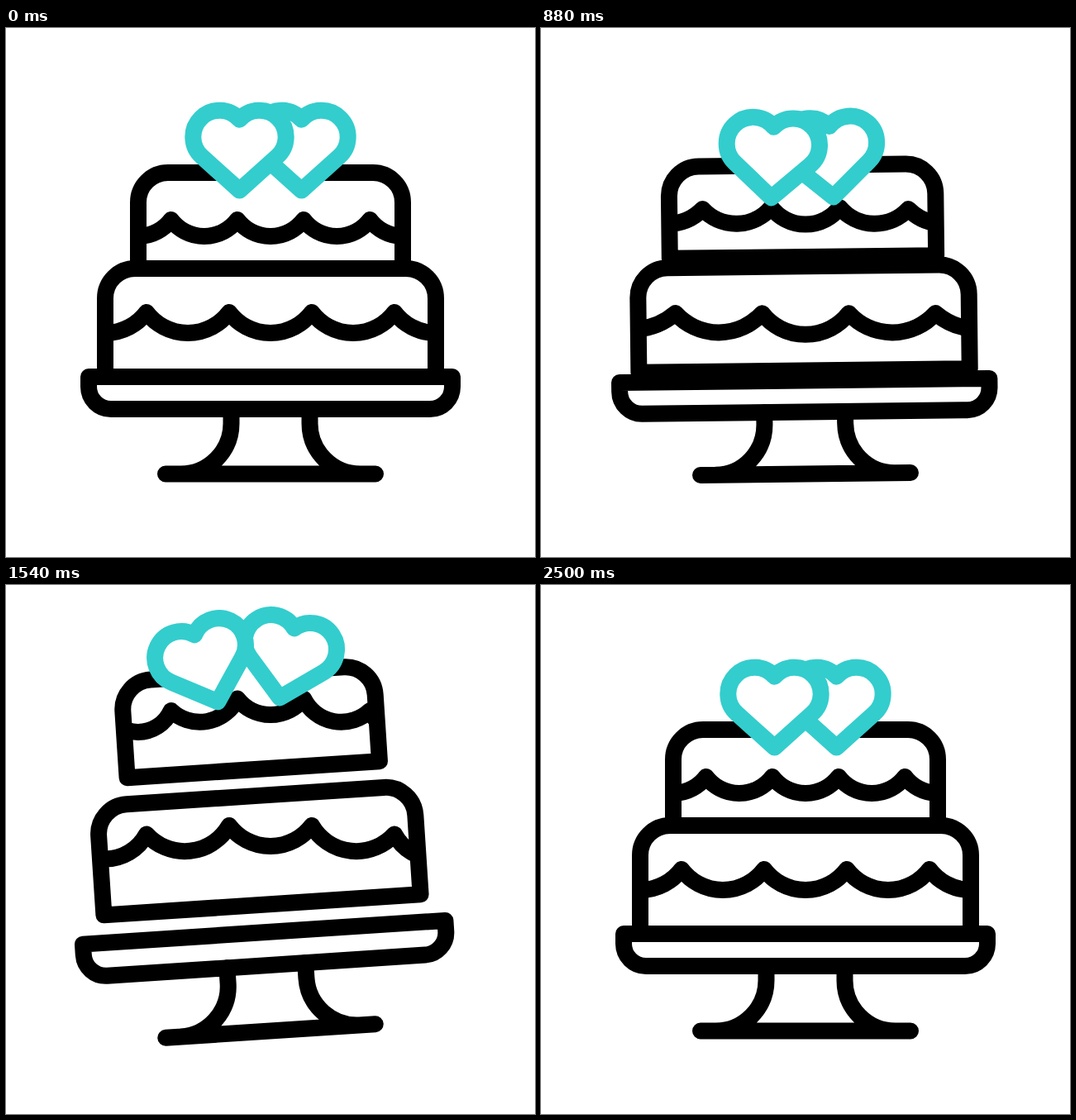
Recreate the animation shown at these times as an HTML page. Size 640 by 640 pixels, loop 3 s.

```html
<!DOCTYPE html>
<html lang="en">
<head>
<meta charset="utf-8">
<title>Jumping cake</title>
<style>
  html, body { margin: 0; width: 100%; height: 100%; overflow: hidden; background: #fff; }
  svg { display: block; width: 100vw; height: 100vh; }
  path { fill: none; stroke: #000; stroke-width: 20; stroke-linejoin: round; }
  .round { stroke-linecap: round; }
  .teal { stroke: #33cdcd; }
  .heart { fill: #fff; }
</style>
</head>
<body>
<!-- The origin is the middle of the foot of the stand. -->
<svg viewBox="-320 -539.5 640 640">
  <defs>
    <clipPath id="lowClip"><path id="lowShape"/></clipPath>
    <clipPath id="topClip"><path id="topShape"/></clipPath>
  </defs>
  <g clip-path="url(#lowClip)"><path id="lowIcing"/></g>
  <g clip-path="url(#topClip)"><path id="topIcing"/></g>
  <g id="cake">
    <path id="stand" class="round"/>
    <path id="plate"/>
    <path id="low"/>
    <path id="top"/>
    <path id="right" class="teal heart"/>
    <path id="left" class="teal heart"/>
    <path id="sparks" class="teal round"/>
  </g>
</svg>
<script>
const LOOP = 3000;
const el = {};
document.querySelectorAll('[id]').forEach(n => el[n.id] = n);

// Half widths and icing steps (across), and heights (down), of the key poses.
const REST = {
  across: { plate: 220, leg: 47.5, low: 200, top: 160, lowStep: 100, topStep: 80.2 },
  down: {
    plateTop: -117.5, plateBottom: -78.5,
    lowTop: -248.5, lowBottom: -117.5, topTop: -364.5, topBottom: -248.5,
    lowIn: -195.5, lowOut: -195.5, lowMid: -170.5, lowSide: -170.5, lowEnd: -170.5,
    topIn: -307.5, topOut: -307.5, topMid: -287.5, topSide: -287.5, topEnd: -287.5
  }
};
const SQUASH = {
  across: { plate: 227, leg: 50, low: 207, top: 168, lowStep: 109, topStep: 85.3 },
  down: {
    plateTop: -109.5, plateBottom: -72.5,
    lowTop: -232.5, lowBottom: -109.5, topTop: -340.5, topBottom: -232.5,
    lowIn: -164.5, lowOut: -170.5, lowMid: -138.5, lowSide: -145.5, lowEnd: -157,
    topIn: -278.5, topOut: -283.5, topMid: -257.5, topSide: -263.5, topEnd: -270.5
  }
};
const AIR = {
  across: { plate: 219.7, leg: 47.5, low: 192, top: 153, lowStep: 100, topStep: 80.2 },
  down: {
    plateTop: -119.5, plateBottom: -79.5,
    lowTop: -285, lowBottom: -153, topTop: -433.5, topBottom: -317,
    lowIn: -248.5, lowOut: -238, lowMid: -223.5, lowSide: -217.5, lowEnd: -208,
    topIn: -402, topOut: -387.5, topMid: -382.5, topSide: -374, topEnd: -361.5
  }
};

const lerp = (a, b, x) => a + (b - a) * x;
const easeOut = power => x => 1 - (1 - x) ** power;
const mix = (a, b, x) =>
  Object.fromEntries(Object.keys(a).map(k => [k, lerp(a[k], b[k], x)]));

// Each key is [time, value, easing towards it].
const track = (...keys) => t => {
  if (t <= keys[0][0]) return keys[0][1];
  for (let i = 1; i < keys.length; i++) {
    const [t0, v0] = keys[i - 1], [t1, v1, ease] = keys[i];
    if (t < t1) {
      const x = (t - t0) / (t1 - t0);
      return lerp(v0, v1, ease ? ease(x) : x);
    }
  }
  return keys[keys.length - 1][1];
};

const squash = (power, fall) => track(
  [205, 0], [560, 1, x => Math.sin(x * Math.PI / 2)], [740, 1],
  [1280, 0, easeOut(power)], [fall, 0], [2160, 1], [2500, 0]);
const spread = squash(2, 1580);
const sink = squash(1.45, 1700);
const tilt = track([740, 0], [1820, -5.05], [2320, 0]);
const heartTilt = track([205, 0], [740, 9], [1280, -15.5], [1680, -15.5], [2160, 9], [2500, 0]);
const heartDrop = track([205, 21.5], [560, 19], [740, 20], [880, 39], [1280, 33], [1800, 31], [2160, 21.5]);
const sparkHead = track([1190, 62], [1400, 106]);
const sparkTail = track([1280, 62], [1480, 106]);

function poseAt(t) {
  const base = t > 740 && t < 2160 ? AIR : REST;
  return {
    ...mix(base.across, SQUASH.across, spread(t)),
    ...mix(base.down, SQUASH.down, sink(t))
  };
}

// The outline starts and ends at a gap in the top edge.
const tier = (w, top, bottom, gap) =>
  `M${gap} ${top}H${w - 36}a36 36 0 0 1 36 36V${bottom}H${-w}V${top + 36}` +
  `a36 36 0 0 1 36 -36H${-gap}`;

function radius(ax, ay, bx, by, cx, cy) {
  const area = Math.abs((bx - ax) * (cy - ay) - (cx - ax) * (by - ay)) / 2;
  return Math.hypot(bx - ax, by - ay) * Math.hypot(cx - bx, cy - by) *
    Math.hypot(cx - ax, cy - ay) / (4 * area);
}

function icing(p, name) {
  const step = p[name + 'Step'];
  const peaks = ['Out', 'Out', 'In', 'In', 'Out', 'Out'].map(k => p[name + k]);
  const dips = ['End', 'Side', 'Mid', 'Side', 'End'].map(k => p[name + k]);
  let x = -2.5 * step, d = `M${x} ${peaks[0]}`;
  dips.forEach((dip, i) => {
    const r = radius(x, peaks[i], x + step / 2, dip, x + step, peaks[i + 1]);
    x += step;
    d += `A${r} ${r} 0 0 0 ${x} ${peaks[i + 1]}`;
  });
  return d;
}

function plate(w, top, bottom) {
  const r = 27;
  return `M${-w} ${top}H${w}V${bottom - r}a${r} ${r} 0 0 1 ${-r} ${r}` +
    `H${r - w}a${r} ${r} 0 0 1 ${-r} ${-r}Z`;
}

function stand(x, top) {
  const leg = s => `M${s * x} ${top}V-61C${s * x} -27.5 ${s * 75} 0 ${s * 108.5} 0`;
  return 'M-127 0H127' + leg(-1) + leg(1);
}

function sparks(t) {
  const a = sparkTail(t), b = sparkHead(t);
  if (b - a < 0.5) return '';
  return [8, 45, 82].map(deg => {
    const s = Math.sin(deg * Math.PI / 180), c = Math.cos(deg * Math.PI / 180);
    return `M${132 + a * s} ${-408.5 - a * c}L${132 + b * s} ${-408.5 - b * c}`;
  }).join('');
}

const draw = (node, d) => node.setAttribute('d', d);
const place = (node, transform) => node.setAttribute('transform', transform);

for (const side of [el.left, el.right]) {
  draw(side, 'M0 0L-45.3 -40.7A32 32 0 1 1 0 -85.7A32 32 0 1 1 45.3 -40.7Z');
}

function render(t) {
  const p = poseAt(t), turn = `rotate(${tilt(t)})`;
  const low = tier(p.low, p.lowTop, p.lowBottom, 0) + 'Z';
  const top = tier(p.top, p.topTop, p.topBottom, 40);

  draw(el.stand, stand(p.leg, p.plateBottom));
  draw(el.plate, plate(p.plate, p.plateTop, p.plateBottom));
  draw(el.low, low);
  draw(el.top, top);
  draw(el.lowShape, low);
  draw(el.topShape, top);
  draw(el.lowIcing, icing(p, 'low'));
  draw(el.topIcing, icing(p, 'top'));
  draw(el.sparks, sparks(t));

  // The icing stays level while everything else tilts.
  for (const n of [el.cake, el.lowShape, el.topShape]) place(n, turn);
  const tip = p.topTop + heartDrop(t), lean = heartTilt(t);
  place(el.left, `translate(-37.5 ${tip}) rotate(${lean})`);
  place(el.right, `translate(37.5 ${tip}) rotate(${-lean})`);
}

function tick() {
  render(performance.now() % LOOP);
  requestAnimationFrame(tick);
}
tick();
</script>
</body>
</html>
```
